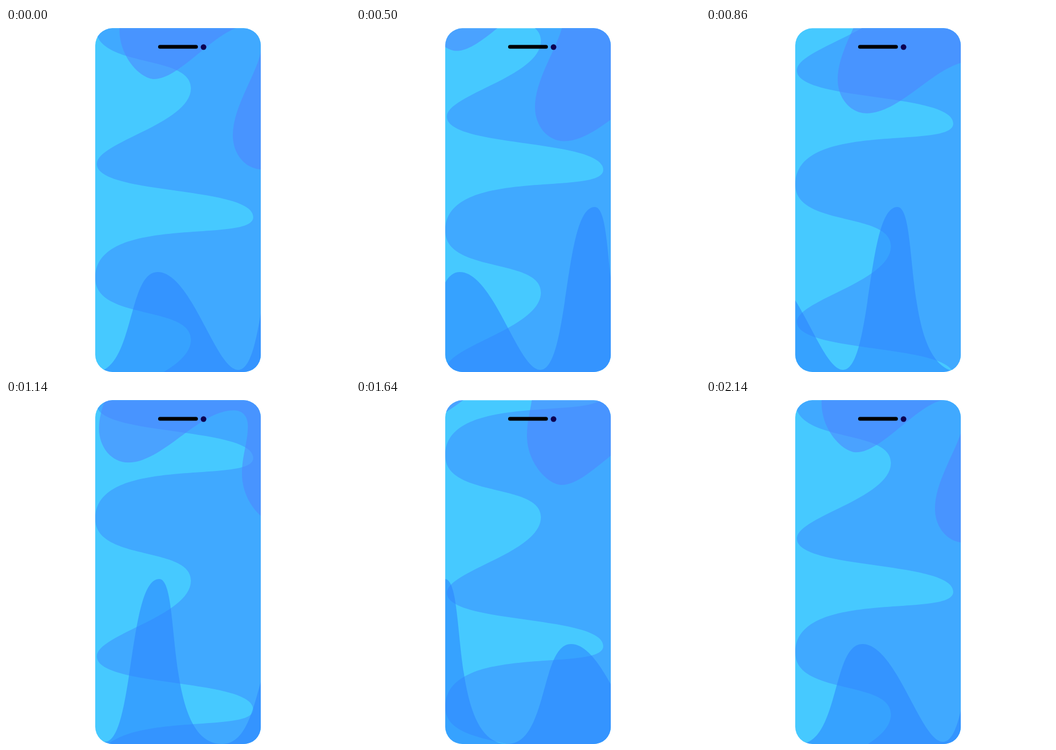
An HTML page that plays this animation: 640 by 640 pixels, repeating every 2210 ms.

```html
<!DOCTYPE html>
<html lang="en">
<head>
<meta charset="utf-8">
<title>Phone waves</title>
<style>
  html, body { margin: 0; width: 100%; height: 100%; overflow: hidden; background: #fff; }
  svg { display: block; width: 100vw; height: 100vh; }
</style>
</head>
<body>
<svg viewBox="0 0 640 640">
  <defs>
    <clipPath id="screen"><rect x="166" y="0.5" width="308" height="639.5" rx="32"/></clipPath>
  </defs>
  <g clip-path="url(#screen)">
    <rect x="166" width="308" height="640" fill="#46c9ff"/>
    <path id="side" fill="#40a9ff"/>
    <path id="floor" fill="#2b83ff" fill-opacity=".55"/>
    <path id="roof" fill="#4f83ff" fill-opacity=".55"/>
  </g>
  <rect x="283" y="31.5" width="74" height="7" rx="3.5" fill="#000"/>
  <circle cx="367.5" cy="35.5" r="5.2" fill="#0d0052"/>
</svg>
<script>
const LOOP = 2210, FPS = 14;
const el = id => document.getElementById(id);

// One period of each wave, as relative curves.
const sideTile = 'c0,66 -175,100 -175,141 c0,58 291,41 291,99 c0,50 -294,-8 -294,113 c0,80 178,50 178,115 ';
const floorTile = 'c75,0 61,-186 118,-186 c63,0 108,182 150,182 c54,0 43,-303 101,-303 c43,0 5,307 117,307 ';
const roofTile = 'c0,51 39,92 65,92 c49,0 119,-98 169,-98 c18,0 31,11 31,31 c0,47 -54,112 -54,172 ' +
  'c0,35 24,63 54,63 c66,0 131,-97 197,-97 c17,0 26,12 26,29 c0,30 -11,55 -11,89 ';

el('side').setAttribute('d', 'M344,-356 ' + sideTile.repeat(4) + 'H900 V-356 Z');
el('floor').setAttribute('d', 'M164,640 ' + floorTile.repeat(3) + 'V700 H164 Z');
el('roof').setAttribute('d', 'M211,-300 V3 ' + roofTile.repeat(2) + 'V-300 Z');

// Distance travelled at each key step; a smooth curve runs through them.
const keys = [0, 7, 12, 16, 20, 23, 30, 31];
const sideShift = glide([0, 88, 174, 244, 314, 362, 463, 468]);
const floorShift = glide([0, 89, 177, 248, 320, 368, 477, 486]);
const roofShift = glide([0, 89, 177, 249, 320, 370, 473, 477]);
const ROOF_SLOPE = 281 / 477;

function glide(v) {
  const last = keys.length - 2;
  const gap = i => keys[i + 1] - keys[i];
  const rate = i => (v[i + 1] - v[i]) / gap(i);
  const tangent = i => i === 0 || i > last ? rate(last)
    : (gap(i) * rate(i - 1) + gap(i - 1) * rate(i)) / (gap(i - 1) + gap(i));
  return n => {
    let i = 0;
    while (i < last && n >= keys[i + 1]) i++;
    const h = gap(i), s = (n - keys[i]) / h, r = 1 - s;
    return v[i] + (v[i + 1] - v[i]) * s * s * (3 - 2 * s)
      + h * s * r * (tangent(i) * r - tangent(i + 1) * s);
  };
}

// Step times fall on hundredths of a second.
function stepAt(ms) {
  let n = 0;
  while (Math.round((n + 1) * 100 / FPS) * 10 <= ms) n++;
  return Math.min(n, 30);
}

const move = (id, x, y) => el(id).setAttribute('transform', `translate(${x} ${y})`);

function draw(ms) {
  const n = stepAt(ms % LOOP), roof = roofShift(n);
  move('side', 0, -sideShift(n));
  move('floor', -floorShift(n), 0);
  move('roof', -roof, -roof * ROOF_SLOPE);
}

const start = performance.now();
function tick() {
  draw(performance.now() - start);
  requestAnimationFrame(tick);
}
tick();
</script>
</body>
</html>
```
